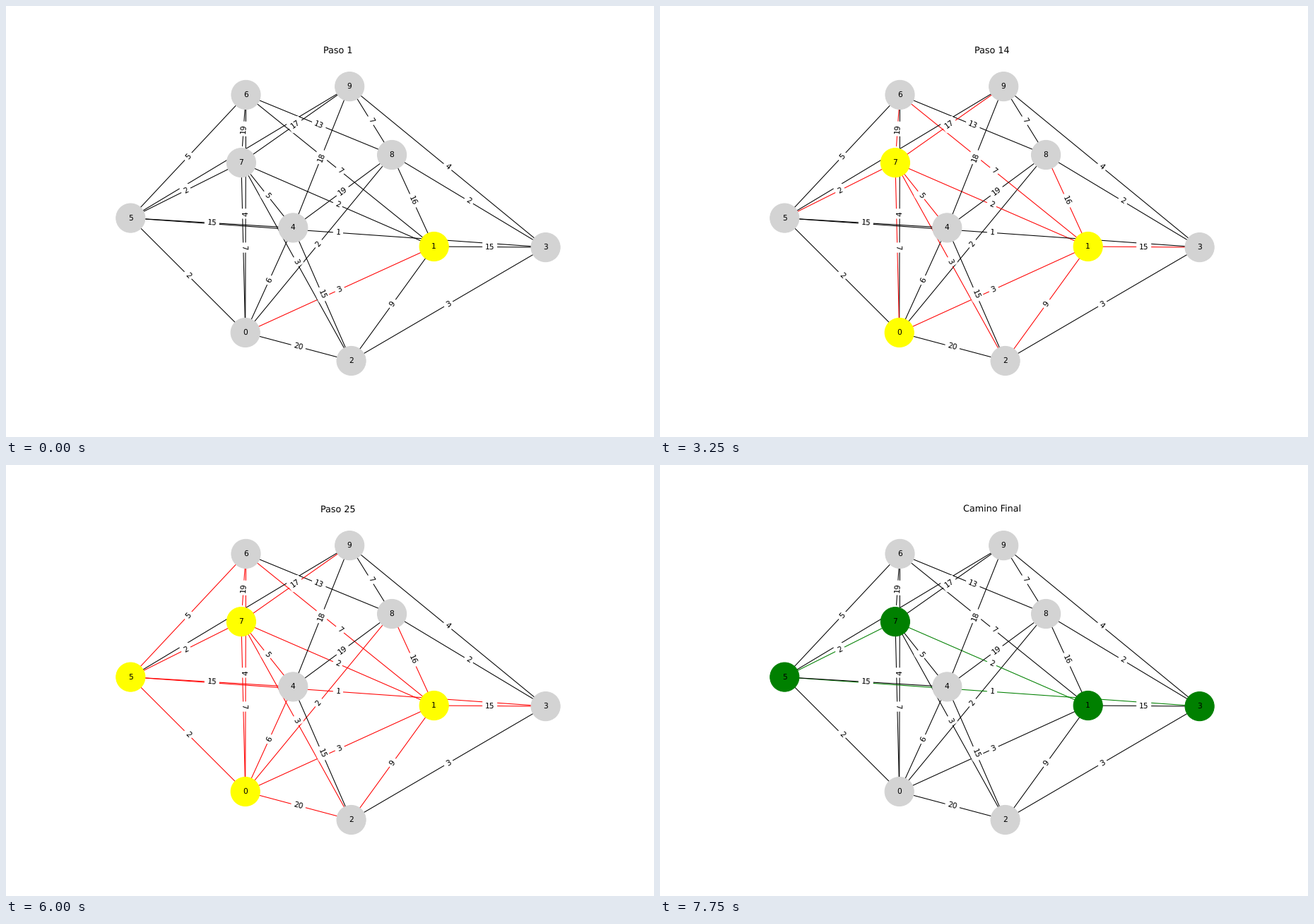
Recreate the animation shown at these times as a matplotlib script. Size 917 by 611 pixels, loop 8 s.

```python
import math

import matplotlib.pyplot as plt
from matplotlib.animation import FuncAnimation
from matplotlib.collections import LineCollection

W, H = 917, 611
DPI = 72          # one point equals one pixel
UNIT = W / 12 / DPI
START, GOAL = 1, 3

plt.rcParams["font.family"] = "DejaVu Sans"
plt.rcParams["text.hinting"] = "none"

NODES = [
    (338.7, 463), (605.7, 341), (488.6, 503), (763.6, 342.1), (406.3, 314.4),
    (176.3, 300.6), (339.5, 125.9), (332.9, 222.1), (546.1, 211), (486.2, 114.1),
]

# WEIGHTS[a] maps every neighbour b > a to the weight of edge a-b
WEIGHTS = [
    {1: 3, 2: 20, 4: 6, 5: 2, 6: 4, 7: 7, 8: 2},
    {2: 9, 3: 15, 6: 7, 7: 2, 8: 16},
    {3: 3, 4: 15, 7: 3},
    {5: 1, 8: 2, 9: 4},
    {5: 15, 7: 5, 8: 19, 9: 18},
    {6: 5, 7: 2, 9: 6},
    {7: 19, 8: 13},
    {9: 17},
    {9: 7},
]
EDGES = {(a, b): w for a, row in enumerate(WEIGHTS) for b, w in row.items()}


def edge(a, b):
    return min(a, b), max(a, b)


def shortest_path(start, goal):
    """Dijkstra's search: every (node, edge) looked at, and the route found."""
    dist, previous, done, steps = {start: 0}, {}, set(), []
    while True:
        node = min(dist.keys() - done, key=lambda n: (dist[n], n))
        if node == goal:
            break
        done.add(node)
        for other in range(len(NODES)):
            link = edge(node, other)
            if link not in EDGES:
                continue
            steps.append((node, link))
            total = dist[node] + EDGES[link]
            if total < dist.get(other, math.inf):
                dist[other], previous[other] = total, node
    path = [goal]
    while path[-1] != start:
        path.append(previous[path[-1]])
    return steps, path


STEPS, PATH = shortest_path(START, GOAL)

fig = plt.figure(figsize=(W / DPI, H / DPI), dpi=DPI, facecolor="white")
ax = fig.add_axes((0, 0, 1, 1))
ax.set_xlim(0, W)
ax.set_ylim(H, 0)
ax.axis("off")

lines = LineCollection([(NODES[a], NODES[b]) for a, b in EDGES],
                       linewidths=UNIT, zorder=1)
ax.add_collection(lines)


def label(x, y, value, **style):
    ax.text(x, y, str(value), size=10 * UNIT, color="black",
            ha="center", va="center", **style)


for (a, b), weight in EDGES.items():
    (x1, y1), (x2, y2) = NODES[a], NODES[b]
    angle = math.degrees(math.atan2(y1 - y2, x2 - x1))
    if abs(angle) > 90:
        angle -= math.copysign(180, angle)
    label((x1 + x2) / 2, (y1 + y2) / 2, weight, rotation=angle, zorder=1,
          bbox=dict(boxstyle="round", ec="white", fc="white", lw=UNIT))

dots = ax.scatter(*zip(*NODES), s=1500 * UNIT ** 2, linewidths=UNIT, zorder=2)
for i, (x, y) in enumerate(NODES):
    label(x, y, i, zorder=3)

title = ax.text(W * 0.5125, H * 0.12 - 6 * UNIT, "", size=12 * UNIT,
                ha="center", va="baseline")


def paint(text, nodes, edges, node_color, edge_color):
    title.set_text(text)
    dots.set_color([node_color if i in nodes else "lightgray"
                    for i in range(len(NODES))])
    lines.set_color([edge_color if e in edges else "black" for e in EDGES])


def update(i):
    if i < len(STEPS):
        nodes, edges = zip(*STEPS[:i + 1])
        paint(f"Paso {i + 1}", nodes, edges, "yellow", "red")
    else:
        route = [edge(a, b) for a, b in zip(PATH, PATH[1:])]
        paint("Camino Final", PATH, route, "green", "green")
    return lines, dots, title


anim = FuncAnimation(fig, update, frames=len(STEPS) + 1, interval=250,
                     init_func=lambda: update(0), repeat=True, repeat_delay=0)
plt.show()
```
